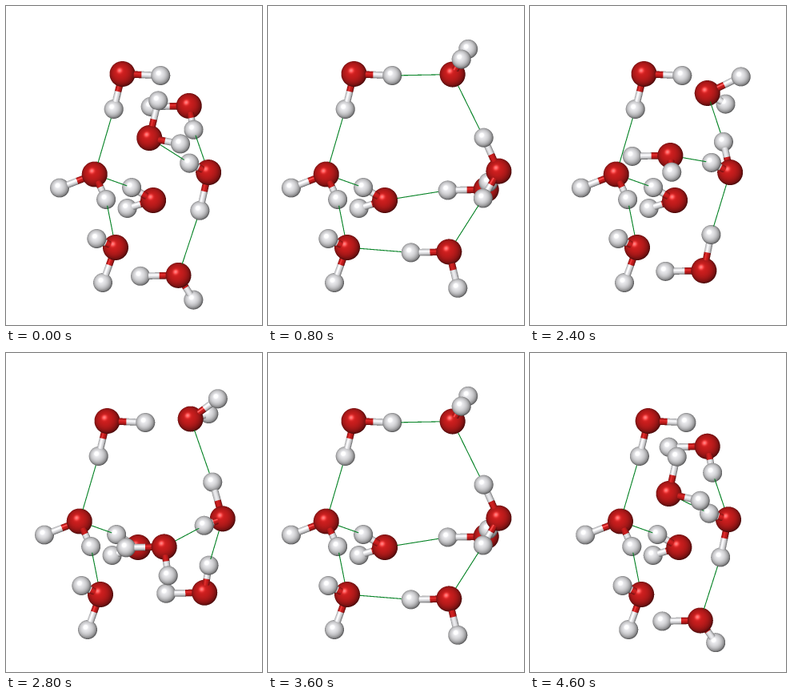
A matplotlib script for the animation above (4800 ms loop, 320 px wide and 399 px high).

```python
import numpy as np
import matplotlib.pyplot as plt
from matplotlib.animation import FuncAnimation

W, H, SS = 320, 399, 3
FRAMES, STEP = 24, 200
R_O, R_H, R_STICK, R_LINE = 16, 12, 4.3, 0.55
RED, WHITE, GREEN = (np.array(c) / 255 for c in
                     [(204, 30, 30), (232, 232, 235), (4, 130, 36)])


def unit(*v):
    return np.array(v) / np.linalg.norm(v)


LIGHT = unit(-0.16, -0.19, 0.95)
GLOSS = unit(-0.22, -0.27, 0.93)

# Eased progress of one 60 degree turn, and the x that keeps the cluster centred
EASE = [0, 1 / 12, 0.2, 0.5, 0.8, 11 / 12, 1]
LEFT = [69.2, 67, 61, 48, 35, 29, 23, 29, 34, 48, 61, 64, 65.5]

# Fixed half: oxygen position, then offsets of its two hydrogens
FIXED = [
    ((0, 210.5, 0), (-43.8, 17, -9), (14.3, 31.5, 33)),
    ((34.7, 85, 43), (47.7, 2, 10), (-10.8, 44, -16)),
    ((73.3, 243, -112), (-27, -16, 36), (-32.5, 10, -34)),
    ((26.2, 302, 100), (-23.6, -11, 40), (-16, 44, -10)),
]
# Turning half: phase on the ring, hydrogens as (along axis, y, depth)
RING = [
    (135, (-48, 0, 0), (13.5, 33, -34)),
    (255, (12.4, -46, -6), None),
    (15, (-47.5, 0, 0), (10.6, 28, 36)),
]
APEX = (-12.6, 47, 8), (-13.5, -8, -46)
RADIUS, TILT, ROLL = 130, np.radians(13.1), 0.02


def turn(v, a):
    """Rotate (along, y, depth) about the slightly tilted axis and project it."""
    s, y, w = v
    y, w = y * np.cos(a) + w * np.sin(a), w * np.cos(a) - y * np.sin(a)
    x = s + w * np.sin(TILT)
    return np.array([x + ROLL * y, y - ROLL * x,
                     s * np.tan(TILT) - w * np.cos(TILT)])


def molecules(k):
    g = EASE[6 - abs(6 - k)]
    a = np.radians(60 * g if k <= 6 else 120 - 60 * g)
    x0 = LEFT[k] + 43.8
    mols = []
    for o, *hs in FIXED:
        o = np.array(o, float) + [x0, 0, 0]
        mols.append((o, [o + h for h in hs]))

    along = 135 + 88 * g
    hub = np.array([x0 + along, 210.9 - ROLL * along, along * np.tan(TILT)])
    bend = np.radians(24 + 48 * g * g)
    free = (46.8 * np.cos(bend), 23.5 * np.sin(bend), -41.8 * np.sin(bend))
    for phase, h1, h2 in RING:
        p = np.radians(phase)
        spoke = (-45.3, RADIUS * np.cos(p), RADIUS * np.sin(p))
        o = hub + turn(spoke, a)
        mols.append((o, [o + turn(h, a) for h in (h1, h2 or free)]))
    mols.append((hub, [hub + turn(h, a) for h in APEX]))
    return mols


def hbonds(m, k):
    """Pairs of hydrogen and accepting oxygen."""
    left, top, back, low, p, q, s, apex = m
    pairs = [(top[1][1], left[0]), (back[1][0], left[0]),
             (left[1][1], low[0]), (p[1][1], apex[0]),
             (apex[1][0], s[0]), (apex[1][1], q[0])]
    if 5 <= k <= 7:
        pairs += [(top[1][0], q[0]), (p[1][0], back[0]), (s[1][0], low[0])]
    return pairs


def shade(base, n):
    diffuse = np.clip(n @ LIGHT, 0, 1)[..., None]
    gloss = np.clip(n @ GLOSS, 0, 1)[..., None] ** 60
    return np.clip(base * (0.36 + 0.66 * diffuse) + 0.4 * gloss, 0, 1)


class Canvas:
    def __init__(self):
        self.rgb = np.ones((H * SS, W * SS, 3))
        self.z = np.full((H * SS, W * SS), -1e9)

    def window(self, lo, hi):
        x0, y0 = np.maximum(np.floor(lo * SS).astype(int), 0)
        x1, y1 = np.ceil(hi * SS).astype(int) + 1
        win = np.s_[y0:min(y1, H * SS), x0:min(x1, W * SS)]
        ys, xs = np.mgrid[win]
        return win, (xs + 0.5) / SS, (ys + 0.5) / SS

    def put(self, win, mask, z, rgb):
        mask = mask & (z > self.z[win])
        self.z[win][mask] = z[mask]
        self.rgb[win][mask] = rgb[mask]

    def ball(self, c, r, base):
        win, x, y = self.window(c[:2] - r, c[:2] + r)
        dx, dy = (x - c[0]) / r, (y - c[1]) / r
        d2 = dx ** 2 + dy ** 2
        nz = np.sqrt(np.clip(1 - d2, 0, 1))
        self.put(win, d2 < 1, c[2] + r * nz,
                 shade(base, np.stack([dx, dy, nz], -1)))

    def rod(self, p, q, r, first, second, flat=False):
        d = (q - p)[:2]
        size = max(np.hypot(*d), 1e-6)
        ux, uy = d / size
        win, x, y = self.window(np.minimum(p, q)[:2] - r,
                                np.maximum(p, q)[:2] + r)
        t = ((x - p[0]) * ux + (y - p[1]) * uy) / size
        e = ((y - p[1]) * ux - (x - p[0]) * uy) / r
        nz = np.sqrt(np.clip(1 - e ** 2, 0, 1))
        rgb = np.where((t < 0.5)[..., None], first, second)
        if not flat:
            rgb = shade(rgb, np.stack([-e * uy, e * ux, nz], -1))
        self.put(win, (t >= 0) & (t <= 1) & (abs(e) < 1),
                 p[2] + t * (q[2] - p[2]) + r * nz, rgb)

    def pixels(self):
        return self.rgb.reshape(H, SS, W, SS, 3).mean((1, 3))


def render(k):
    canvas = Canvas()
    mols = molecules(k)
    for o, hs in mols:
        canvas.ball(o, R_O, RED)
        for h in hs:
            canvas.rod(o, h, R_STICK, RED, WHITE)
            canvas.ball(h, R_H, WHITE)
    for h, o in hbonds(mols, k):
        canvas.rod(h, o, R_LINE, GREEN, GREEN, flat=True)
    return canvas.pixels()


fig = plt.figure(figsize=(W / 100, H / 100), dpi=100, facecolor="white")
ax = fig.add_axes([0, 0, 1, 1])
ax.axis("off")
image = ax.imshow(np.ones((H, W, 3)), aspect="auto", interpolation="nearest")


def update(i):
    # Swing there and back: 12 steps each way
    image.set_data(render(12 - abs(12 - (i + 1) % FRAMES)))
    return [image]


anim = FuncAnimation(fig, update, frames=FRAMES, interval=STEP,
                     repeat=True, repeat_delay=0)
plt.show()
```
